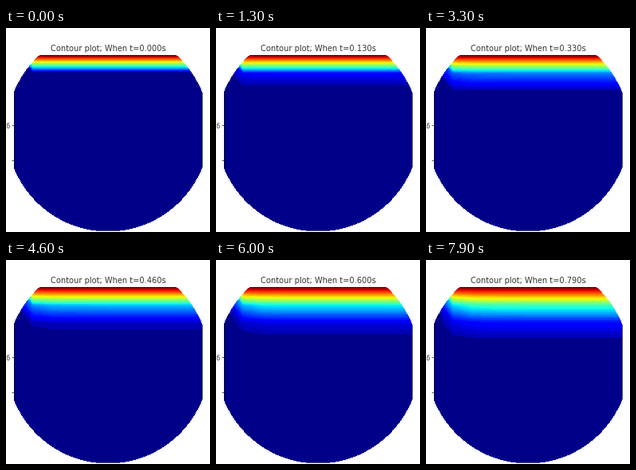
Write a matplotlib script that moves like this. It is 256 px wide and 256 px high and loops after 8 s.

```python
import numpy as np
import matplotlib.pyplot as plt
from matplotlib.animation import FuncAnimation
from matplotlib.patches import Annulus

SIZE, DPI = 256, 64
K = 59.5 / DPI            # scale of fonts and strokes
FRAMES, DT = 80, 0.01
N = 11                    # grid nodes per side
INK = "0.2"


def solve():
    """Heat spreading from a hot top edge; cold left side, insulated right."""
    u = np.zeros((N, N))
    u[-1, 1:] = 100
    states = [u]
    for _ in range(FRAMES - 1):
        v = u.copy()
        v[1:-1, 1:-1] += DT * (u[2:, 1:-1] + u[:-2, 1:-1] + u[1:-1, 2:]
                               + u[1:-1, :-2] - 4 * u[1:-1, 1:-1])
        v[1:-1, -1] = v[1:-1, -2]
        states.append(v)
        u = v
    return states


plt.rcParams["font.family"] = "DejaVu Sans"
fig = plt.figure(figsize=(SIZE / DPI, SIZE / DPI), dpi=DPI, facecolor="white")

ax = fig.add_axes([10.4 / SIZE, 1 - 254.3 / SIZE, 236 / SIZE, 220 / SIZE])
ax.set(xlim=(0, N - 1), ylim=(0, N - 1), yticks=range(0, N, 2))
ax.tick_params(length=3.5 * K, width=0.8 * K, pad=3.5 * K,
               labelsize=10 * K, labelcolor=INK)
for spine in ax.spines.values():
    spine.set_linewidth(0.8 * K)
title = ax.set_title("", fontsize=12 * K, pad=6 * K, color=INK)

# White surround that leaves a round window
mask = fig.add_axes([0, 0, 1, 1], zorder=5)
mask.set(xlim=(0, SIZE), ylim=(0, SIZE))
mask.axis("off")
mask.add_patch(Annulus((SIZE / 2, SIZE / 2), SIZE, SIZE / 2,
                       fc="white", lw=0, antialiased=False))

states = solve()
levels = np.linspace(0, 100, 51)
shades = plt.cm.jet((levels[:-1] + 1) / 100)
shades[1] = shades[0]     # the two coldest bands look alike
axis = np.arange(N)
shown = []


def draw(i):
    while shown:
        shown.pop().remove()
    shown.append(ax.contourf(axis, axis, states[i], levels, colors=shades))
    title.set_text(f"Contour plot; When t={i * DT:.3f}s")
    return []


anim = FuncAnimation(fig, draw, frames=FRAMES, interval=100,
                     repeat=True, repeat_delay=0, blit=False)
plt.show()
```
